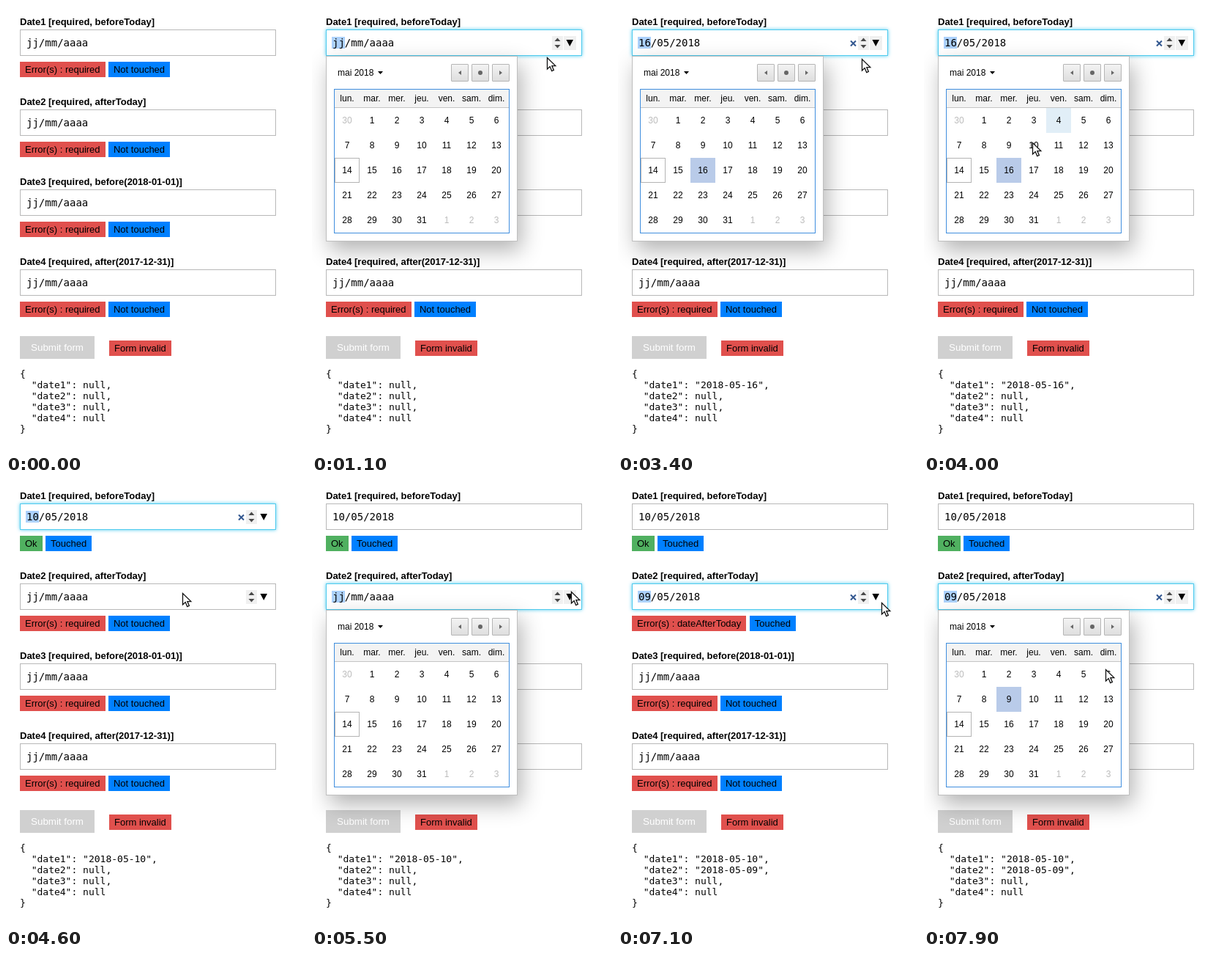
Animation, 410 px wide and 608 px high, one loop 8 s. Source, as an HTML page:

```html
<!DOCTYPE html>
<html lang="fr">
<head>
<meta charset="utf-8">
<title>Date form</title>
<style>
html, body { margin: 0; width: 100%; height: 100%; overflow: hidden; background: #fff; }
body { position: relative; font: 13px/15px "Liberation Sans", Arial, sans-serif; color: #000; }
div, svg, pre { position: absolute; margin: 0; box-sizing: border-box; white-space: pre; }
svg { overflow: visible; }
.label { left: 19px; top: 14px; font-weight: bold; }
.input { left: 19px; top: 32px; width: 350px; height: 36px; padding-left: 8px; border: 1px solid #b8b8b8;
  background: #fff; font: 14px/34px "DejaVu Sans Mono", monospace; }
.focus { border-color: #51cbee; box-shadow: 0 0 5px #51cbee; }
.focus span { background: #acd1fc; padding-left: 1px; margin-left: -1px; }
.badges { left: 19px; top: 76px; display: flex; gap: 4.4px; }
.badges span, .invalid { padding: 3px 7px; }
.red { background: #e0504d; }
.green { background: #50b060; }
.blue { background: #0080ff; }
.submit { left: 19px; top: 450px; width: 102px; height: 31px; background: #d0d0d0; color: #fff;
  font-size: 13.333px; line-height: 31px; text-align: center; }
.invalid { left: 141px; top: 456px; }
pre { left: 19px; top: 494px; font: 13px/15px "DejaVu Sans Mono", monospace; }
.popup { left: 19px; top: 68px; width: 262px; height: 253px; background: #fff; border: 1px solid #bfbfbf;
  box-shadow: 5px 12px 28px rgba(0,0,0,.3); font-size: 12px; }
.month { left: 15px; top: 15px; }
.nav { top: 10px; width: 24px; height: 24px; border: 1px solid #b5b5b5; border-radius: 1px;
  background: linear-gradient(#f3f3f3, #dedede); }
.grid { left: 10px; top: 44px; width: 240px; height: 197px; border: 1px solid #3f8ede; }
.head { left: 0; top: 0; width: 238px; height: 25px; background: #f3f3f3; border-bottom: 1px solid #c4c4c4; }
.cell { width: 34px; height: 34px; line-height: 34px; text-align: center; }
.other { color: #bcbcbc; }
.today { border: 1px solid #b4b4b4; line-height: 32px; }
.hover { background: #e1eef7; }
.picked { background: #b9cbe9; }
</style>
</head>
<body>
<div id="form"></div>
<svg id="cursor" width="14" height="20">
  <path d="M.5 .5V16L4.2 12.6L6.7 18.6L9.4 17.4L6.9 11.6H11.8Z" fill="#fff" stroke="#111" stroke-width="1.3"/>
</svg>
<script>
const LOOP = 8000, STEP = 100, PITCH = 109;
const rules = ['beforeToday', 'afterToday', 'before(2018-01-01)', 'after(2017-12-31)'];
const weekdays = ['lun.', 'mar.', 'mer.', 'jeu.', 'ven.', 'sam.', 'dim.'];
// Popups: field row, opening, picking and closing times, day picked
const popups = [
  { row: 0, open: 1000, pick: 1900, close: 2300, day: 16, status: 'Error(s) : dateBeforeToday' },
  { row: 0, open: 2800, pick: 4200, close: 4600, day: 10, status: 'Ok' },
  { row: 1, open: 5500, pick: 6400, close: 6800, day: 9, status: 'Error(s) : dateAfterToday' },
  { row: 1, open: 7300, pick: 9000, close: 9000 },
];
// Mouse: time, x, y
const path = [
  [300, 388, 52], [700, 350, 48], [1000, 350, 48], [1800, 118, 226], [1900, 116, 224], [2000, 120, 220],
  [2200, 183, 178], [2400, 349, 50], [2800, 349, 50], [3100, 354, 54], [3400, 333, 72], [3600, 312, 100],
  [4000, 148, 186], [4300, 150, 184], [4600, 241, 154], [5000, 318, 162], [5300, 354, 152], [5500, 354, 152],
  [5900, 155, 254], [6000, 143, 262], [6200, 114, 296], [6500, 118, 294], [6800, 230, 230], [7100, 360, 167],
  [7300, 363, 165], [7500, 355, 170], [7800, 280, 232], [7900, 248, 258],
];

function mouse(t) {
  const i = path.findIndex(p => p[0] > t);
  if (i === 0) return [-100, -100];
  if (i < 0) return path.at(-1).slice(1);
  const [a, b] = [path[i - 1], path[i]], k = (t - a[0]) / (b[0] - a[0]);
  return [1, 2].map(n => a[n] + (b[n] - a[n]) * k);
}

const box = (cls, content, style = '') => `<div class="${cls}" style="${style}">${content}</div>`;
const two = n => String(n).padStart(2, '0');
const shape = (d, fill) => `<path d="${d}" fill="${fill}"/>`;

function controls(pressed, filled) {
  return '<svg style="left:-20px;top:-33px" width="350" height="70">' +
    shape('M328 41h15v19h-15z', '#f0f0f0') +
    (pressed ? shape('M344 41h17v19h-17z', '#f0f0f0') : '') +
    shape('M331.5 48l4-4.5 4 4.5zM331.5 53l4 4.5 4-4.5z', '#4a4a4a') +
    shape('M347.5 46h9.5l-4.75 9z', '#000') +
    (filled ? '<path d="M318 47.5l7 7m0-7l-7 7" stroke="#31568f" stroke-width="2"/>' : '') + '</svg>';
}

function calendar(row, picked, [mx, my], frozen) {
  const nav = [shape('M13 8v6l-4-3z', '#666'), '<circle cx="11" cy="11" r="3" fill="#666"/>',
    shape('M9 8v6l4-3z', '#666')].map((icon, i) =>
    box('nav', `<svg width="22" height="22">${icon}</svg>`, `left:${170 + 28 * i}px`)).join('');
  let cells = '';
  for (let i = 0; i < 35; i++) {
    const x = i % 7 * 34, y = 25 + (i / 7 | 0) * 34;
    const dx = mx - 31 - x, dy = my - 114 - row * PITCH - y;
    const over = !frozen && dx >= 0 && dx < 34 && dy >= 0 && dy < 34;
    const other = i < 1 || i > 31;
    const cls = ['cell', other && 'other', i === 14 && 'today', over && 'hover',
      !other && i === picked && 'picked'].filter(Boolean).join(' ');
    cells += box(cls, i < 1 ? 30 : i > 31 ? i - 31 : i, `left:${x}px;top:${y}px`);
  }
  const head = weekdays.map((d, i) => box('cell', d, `left:${i * 34}px;top:-5px`)).join('');
  return box('popup', box('month', 'mai 2018') +
    `<svg style="left:70px;top:20px" width="8" height="5">${shape('M0 0h7l-3.5 4z', '#000')}</svg>` +
    nav + box('grid', box('head', head) + cells));
}

function render(t) {
  const [mx, my] = mouse(t), open = popups.find(p => t >= p.open && t < p.close);
  const focus = t < 1000 ? -1 : t < 5500 ? 0 : 1;
  const entries = rules.map((_, row) => popups.filter(p => p.row === row && t >= p.close).at(-1));

  const rows = rules.map((rule, row) => {
    const entry = entries[row], top = row * PITCH, active = focus === row;
    const hover = !open && mx >= 19 && mx < 369 && my >= 32 + top && my < 68 + top;
    const isOpen = open && open.row === row;
    const status = entry ? entry.status : 'Error(s) : required';
    const value = entry ? `<span>${two(entry.day)}</span>/05/2018` : '<span>jj</span>/mm/aaaa';
    return box('', box('label', `Date${row + 1} [required, ${rule}]`) +
      box(active ? 'input focus' : 'input', value + (active || hover ? controls(isOpen, entry) : '')) +
      box('badges', `<span class="${status === 'Ok' ? 'green' : 'red'}">${status}</span>` +
        `<span class="blue">${entry ? 'Touched' : 'Not touched'}</span>`), `top:${top}px`);
  });

  const json = entries.map((e, i) => `  "date${i + 1}": ${e ? `"2018-05-${two(e.day)}"` : 'null'}`);
  let popup = '';
  if (open) {
    const frozen = t >= open.pick, last = entries[open.row];
    const picked = frozen ? open.day : last && last.day;
    // The day highlight trails the pointer by one step
    popup = box('', calendar(open.row, picked, mouse(t - STEP), frozen), `top:${open.row * PITCH}px`);
  }
  document.getElementById('form').innerHTML = rows.join('') + box('submit', 'Submit form') +
    box('invalid red', 'Form invalid') + `<pre>{\n${json.join(',\n')}\n}</pre>` + popup;
  document.getElementById('cursor').style.cssText = `left:${Math.round(mx)}px;top:${Math.round(my)}px`;
}

let shown = -1;
function tick() {
  const t = Math.floor(performance.now() % LOOP / STEP) * STEP;
  if (t !== shown) render(shown = t);
  requestAnimationFrame(tick);
}
tick();
</script>
</body>
</html>
```
